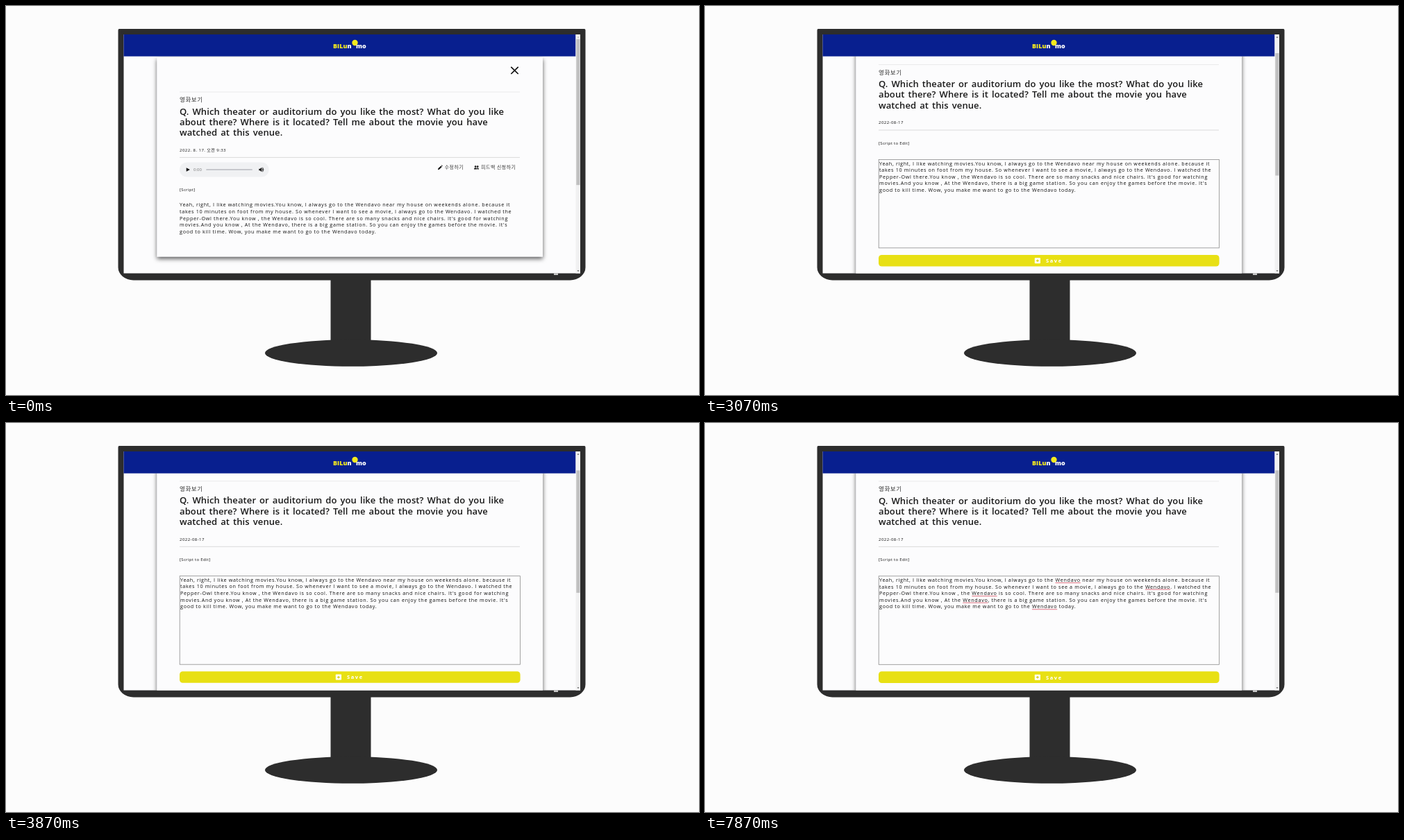
Recreate the animation shown at these times as an HTML page. Size 998x561 px, loop 8000 ms.

```html
<!DOCTYPE html>
<html lang="ko">
<head>
<meta charset="utf-8">
<title>Script editor</title>
<style>
  html, body { margin: 0; width: 100%; height: 100%; overflow: hidden; background: #fcfcfc; }
  svg { display: block; width: 100vw; height: 100vh; }
  text { font-family: 'Open Sans', 'Noto Sans', 'Noto Sans CJK KR', 'Noto Sans CJK', sans-serif; fill: #111; white-space: pre; }
  .title { font-size: 13px; font-weight: 600; letter-spacing: .1px; word-spacing: 1.5px; fill: #1a1a1a; }
  .body { font-size: 7.2px; letter-spacing: .71px; word-spacing: -.12px; }
  .small { font-size: 6px; letter-spacing: .45px; }
  .tag { font-size: 6px; letter-spacing: .32px; }
  .topic { font-size: 8.5px; letter-spacing: .6px; fill: #333; }
  .btn { font-size: 6.8px; letter-spacing: .55px; fill: #333; }
  .time { font-size: 6px; fill: #777; }
  .save { font-size: 7.5px; font-weight: 700; letter-spacing: 1.6px; fill: #fff; }
  .brand { font-size: 9px; font-weight: 800; fill: #fff; }
  .rule { stroke: #d2d2d2; stroke-width: .8; }
</style>
</head>
<body>
<svg viewBox="0 0 998 561" preserveAspectRatio="none">
  <defs>
    <clipPath id="page"><rect x="169.5" y="72.5" width="651" height="313"/></clipPath>
    <clipPath id="press"><rect x="616" y="225.5" width="48.5" height="14.5" rx="1.5"/></clipPath>
    <filter id="shadow" x="-5%" y="-5%" width="110%" height="112%">
      <feDropShadow dx="0" dy="3" stdDeviation="3.2" flood-color="#000" flood-opacity=".65"/>
    </filter>
  </defs>

  <rect width="998" height="561" fill="#fcfcfc"/>
  <g fill="#2d2d2d">
    <path d="M163 33H833Q834.5 33 834.5 35V377A22 18.5 0 0 1 812.5 395.5H183.5A22 18.5 0 0 1 161.5 377V35Q161.5 33 163 33Z"/>
    <rect x="467.5" y="394" width="58" height="95"/>
    <ellipse cx="497" cy="500.5" rx="124" ry="19.3"/>
  </g>
  <rect x="789" y="385.5" width="6" height="2.5" fill="#c8c8c8"/>
  <rect x="169.5" y="41" width="657.5" height="344.5" fill="#fcfcfd"/>

  <g clip-path="url(#page)">
    <g id="scroller">
      <rect id="card" x="217.5" y="74" width="555.5" height="287.5" fill="#fcfcfd" filter="url(#shadow)"/>
      <path d="M727.3 87.8L737.7 98M737.7 87.8L727.3 98" stroke="#111" stroke-width="1.7"/>
      <path class="rule" d="M250 124H740" stroke-opacity=".6"/>
      <path class="rule" d="M250 218.4H740"/>
      <text class="topic" x="250" y="138.3">영화보기</text>
      <g id="title"></g>

      <g id="view">
        <text class="small" x="250" y="209.7">2022. 8. 17. 오전 9:33</text>
        <rect x="250" y="225.4" width="128.7" height="21.2" rx="10.6" fill="#f0f1f3"/>
        <path d="M259.7 233.2L264.9 236L259.7 238.8Z" fill="#111"/>
        <text class="time" x="270" y="238.2">0:00</text>
        <path d="M289 236H354" stroke="#b9bbc0" stroke-width="1.7" stroke-linecap="round"/>
        <path d="M364.3 234.7H366L368.2 232.8V239.2L366 237.3H364.3Z" fill="#111"/>
        <path d="M369 234.3Q370.3 236 369 237.7M369.5 232.8Q372.3 236 369.5 239.2" fill="none" stroke="#111" stroke-width=".8"/>

        <g clip-path="url(#press)"><circle id="ripple" cx="640" cy="233" fill="#222"/></g>
        <rect id="hover" x="616" y="225.5" width="48.5" height="14.5" rx="1.5" fill="none" stroke="#444" stroke-width=".9"/>
        <path d="M622 236.2L622.4 234.3L626.3 230.4L627.8 231.9L623.9 235.8ZM626.9 229.9L627.5 229.3L628.9 230.7L628.3 231.3Z" fill="#111"/>
        <text class="btn" x="631.8" y="234.8">수정하기</text>
        <g fill="#111">
          <circle cx="676.1" cy="231.5" r="1.3"/><circle cx="679.2" cy="231.5" r="1.3"/>
          <path d="M673.9 235.5Q673.9 233.3 676 233.3T678.1 235.5ZM678.6 235.5Q678.6 233.9 677.9 233.3Q680.9 232.9 681 235.5Z"/>
        </g>
        <text class="btn" x="684.3" y="234.8">피드백 신청하기</text>
        <text class="tag" x="250" y="266.8">[Script]</text>
        <g id="script"></g>
      </g>

      <g id="edit">
        <text class="small" x="250" y="209.7">2022-08-17</text>
        <text class="tag" x="250" y="239.2">[Script to Edit]</text>
        <rect x="250.2" y="260.8" width="490.2" height="127.5" fill="#fcfcfd" stroke="#8c8c8c" stroke-width=".8"/>
        <g id="draft"></g>
        <g id="marks" stroke="#d8485c" stroke-width=".75"></g>
        <path id="caret" d="M538 299.8V308" stroke="#333" stroke-width=".5"/>
        <rect x="250" y="398.3" width="490.6" height="16.7" rx="4.5" fill="#e8e014"/>
        <rect x="474.8" y="402.7" width="8.2" height="8" rx=".8" fill="#fff"/>
        <path d="M477 406.7H480.8M478.9 404.8V408.6" stroke="#d8d014" stroke-width="1.2"/>
        <text class="save" x="491" y="409.5">Save</text>
      </g>
    </g>
  </g>

  <rect x="169.5" y="41" width="651" height="31.6" fill="#081f8f"/>
  <text class="brand" x="471" y="61.2"><tspan fill="#f5ea1e">BILu</tspan>n</text>
  <circle cx="502.5" cy="53" r="4.2" fill="#f5ea1e"/>
  <text class="brand" x="504" y="61.2">mo</text>

  <rect x="820.5" y="41" width="6.5" height="344.5" fill="#f1f1f2"/>
  <rect id="thumb" x="821.3" width="5.2" fill="#c0c0c1"/>
  <path id="up" d="M822.5 45.8L824 44L825.5 45.8Z"/>
  <path d="M822.5 381.2L824 383L825.5 381.2Z" fill="#555"/>
</svg>

<script>
const LOOP = 8000;
const EDIT_AT = 2300;
const NOTCH = 40;
const VENUE = 'Wendavo';
const $ = id => document.getElementById(id);

const question = [
  'Q. Which theater or auditorium do you like the most? What do you like',
  'about there? Where is it located? Tell me about the movie you have',
  'watched at this venue.'
];
const answer = [
  `Yeah, right, I like watching movies.You know, I always go to the ${VENUE} near my house on weekends alone. because it`,
  `takes 10 minutes on foot from my house. So whenever I want to see a movie, I always go to the ${VENUE}. I watched the`,
  `Pepper-Owl there.You know , the ${VENUE} is so cool. There are so many snacks and nice chairs. It's good for watching`,
  `movies.And you know , At the ${VENUE}, there is a big game station. So you can enjoy the games before the movie. It's`,
  `good to kill time. Wow, you make me want to go to the ${VENUE} today.`
];

const lines = (rows, cls, x, y, step) => rows
  .map((row, i) => `<text class="${cls}" x="${x}" y="${y + i * step}">${row}</text>`).join('');

// Spelling line below the venue name
function underline(text) {
  const at = text.textContent.indexOf(VENUE);
  const from = text.getStartPositionOfChar(at);
  const to = text.getEndPositionOfChar(at + VENUE.length - 1);
  return `<path d="M${from.x} ${from.y + 1.5}H${to.x}"/>`;
}

$('title').innerHTML = lines(question, 'title', 250, 156.5, 15.35);
$('script').innerHTML = lines(answer, 'body', 250, 289.4, 9.57);
$('draft').innerHTML = lines(answer, 'body', 251, 269, 9.57);
$('marks').innerHTML = [...$('draft').children].map(underline).join('');

const ramp = (t, from, to) => Math.min(1, Math.max(0, (t - from) / (to - from)));
const ease = p => p * p * (3 - 2 * p);
const show = (id, on) => $(id).setAttribute('visibility', on ? 'visible' : 'hidden');
const set = (id, attrs) => {
  for (const key in attrs) $(id).setAttribute(key, attrs[key]);
};

function scrollAt(t) {
  const notch = (from, to) => NOTCH * ease(ramp(t, from, to));
  return notch(2850, 3088) + notch(3110, 3340) - notch(3605, 3880);
}

function caretAt(t) {
  return (t >= 5840 && t < 6740) || (t >= 7210 && t < 7710);
}

function draw(t) {
  const editing = t >= EDIT_AT;
  const y = scrollAt(t);
  show('view', !editing);
  show('edit', editing);
  show('marks', t >= 6240);
  show('caret', caretAt(t));
  set('scroller', { transform: `translate(0 ${-y})` });
  set('card', { height: editing ? 586 : 287.5 });
  set('thumb', { y: 47.7 + y * .515, height: editing ? 176.5 : 210.5 });
  set('up', { fill: y > 0 ? '#555' : '#b5b5b5' });
  set('hover', { opacity: ease(ramp(t, 620, 850)) });
  set('ripple', {
    r: 28 * ease(ramp(t, 1670, 2050)),
    opacity: .1 * (1 - ramp(t, 1850, 2250))
  });
}

const start = performance.now();
function tick() {
  draw((performance.now() - start) % LOOP);
  requestAnimationFrame(tick);
}
tick();
</script>
</body>
</html>
```
